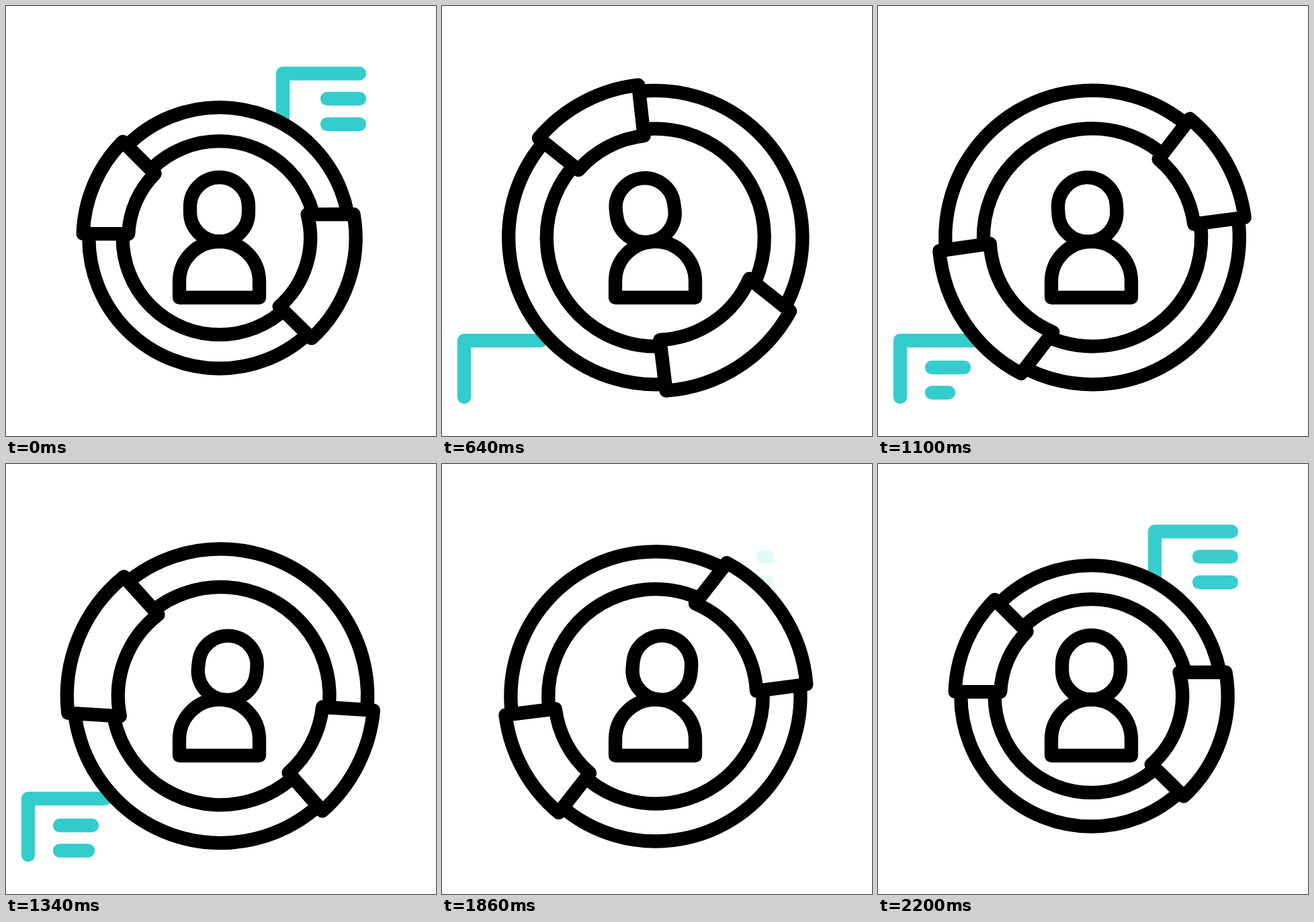
An HTML page with a canvas that plays this animation: 640x640 px, repeating every 2.4 s.

```html
<!DOCTYPE html>
<html lang="en">
<head>
<meta charset="utf-8">
<title>Support ring</title>
<style>
html, body { margin: 0; width: 100%; height: 100%; overflow: hidden; background: #fff; }
canvas { display: block; width: 640px; height: 640px; }
</style>
</head>
<body>
<canvas id="stage" width="640" height="640"></canvas>
<script>
const ctx = document.getElementById('stage').getContext('2d');
const LOOP = 2400, STEP = 20, START = 200, SPAN = 2000;
const TEAL = '#33cccc', RAD = Math.PI / 180;

const clamp = v => Math.min(1, Math.max(0, v));
const smooth = v => v * v * (3 - 2 * v);
const ease = (u, from, to) => smooth(clamp((u - from) / (to - from)));
const mix = (a, b, k) => a + (b - a) * k;

// cubic-bezier(1/3, 0, 5/6, 1), solved by bisection
function spin(u) {
  let lo = 0, hi = 1;
  for (let i = 0; i < 30; i++) {
    const s = (lo + hi) / 2, r = 1 - s;
    if (r * r * s + 2.5 * r * s * s + s * s * s < u) lo = s; else hi = s;
  }
  return smooth(lo);
}

// Strokes the part of a polyline between fractions a and b
function trim(points, a, b) {
  if (b - a < 0.002) return;
  const lens = points.slice(1).map((p, i) => Math.hypot(p[0] - points[i][0], p[1] - points[i][1]));
  const total = lens.reduce((x, y) => x + y);
  let pos = 0, open = false;
  ctx.beginPath();
  lens.forEach((len, i) => {
    const k0 = clamp((a * total - pos) / len), k1 = clamp((b * total - pos) / len);
    const [p, q] = [points[i], points[i + 1]];
    if (k1 > k0) {
      if (!open) ctx.moveTo(mix(p[0], q[0], k0), mix(p[1], q[1], k0));
      ctx.lineTo(mix(p[0], q[0], k1), mix(p[1], q[1], k1));
      open = true;
    }
    pos += len;
  });
  ctx.stroke();
}

const topLines = [
  [[412, 170], [412, 100.5], [526, 100.5]],
  [[478, 138], [526, 138]],
  [[478, 176], [526, 176]]
];
const lowLines = [
  { path: [[147, 498], [33, 498], [33, 582]], from: 0.1, to: 0.22 },
  { path: [[80, 538], [128, 538]], from: 0.22, to: 0.36 },
  { path: [[80, 575.5], [122, 575.5]], from: 0.36, to: 0.52 }
];

function drawLabels(u) {
  ctx.strokeStyle = TEAL;
  if (u < 0.5) {
    const out = ease(u, 0, 0.1);
    ctx.globalAlpha = 1 - out;
    topLines.forEach(p => trim(p, out, 1));
  } else {
    const grow = ease(u, 0.78, 1);
    ctx.globalAlpha = 0.97 * grow;
    topLines.forEach(p => trim(p, 0, grow));
  }
  const out = ease(u, 0.7, 0.8);
  ctx.globalAlpha = 1 - out;
  lowLines.forEach(l => trim(l.path, out, ease(u, l.from, l.to)));
  ctx.globalAlpha = 1;
}

function circle(r) {
  ctx.beginPath();
  ctx.arc(0, 0, r, 0, 2 * Math.PI);
  ctx.fill();
  ctx.stroke();
}

// Outer edge spans o0..o1 degrees, inner edge i0..i1
function segment(k, o0, o1, i0, i1) {
  ctx.beginPath();
  ctx.arc(0, 0, 203 * k, o0 * RAD, o1 * RAD);
  ctx.arc(0, 0, 135.5 * k, i1 * RAD, i0 * RAD, true);
  ctx.closePath();
  ctx.fill();
  ctx.stroke();
}

function drawRing(u) {
  const k = 1 + 0.126 * (ease(u, 0, 0.23) - ease(u, 0.78, 1));
  ctx.save();
  ctx.translate(318.5, 345.2);
  ctx.rotate(spin(u) * 2 * Math.PI);
  ctx.translate(-0.9, 0);
  circle(194.3 * k);
  circle(144 * k);
  segment(k, 181.75, 224.9, 182.6, 224.9);
  segment(k, -10, 47.4, -15, 48.9);
  ctx.restore();
}

function drawPerson(u) {
  const tilt = -10 * ease(u, 0, 0.31) + 20.2 * ease(u, 0.31, 0.667) - 10.2 * ease(u, 0.667, 1);
  ctx.save();
  ctx.translate(317.5, 410);
  ctx.beginPath();
  ctx.arc(0, 0, 59.5, Math.PI, 0);
  ctx.lineTo(59.5, 24);
  ctx.lineTo(-59.5, 24);
  ctx.closePath();
  ctx.stroke();
  ctx.rotate(tilt * RAD);
  ctx.beginPath();
  ctx.arc(0, -111.5, 43.5, Math.PI, 0);
  ctx.arc(0, -103, 43.5, 0, Math.PI);
  ctx.closePath();
  ctx.stroke();
  ctx.restore();
}

function draw(now) {
  const t = Math.floor((now % LOOP) / STEP + 1e-6) * STEP;
  const u = clamp((t - START) / SPAN);
  ctx.fillStyle = '#fff';
  ctx.fillRect(0, 0, 640, 640);
  ctx.lineWidth = 20.3;
  ctx.lineCap = ctx.lineJoin = 'round';
  drawLabels(u);
  ctx.strokeStyle = '#000';
  drawRing(u);
  drawPerson(u);
}

let begin = null;
function tick(now) {
  if (begin === null) begin = now;
  draw(Math.max(0, now - begin));
  requestAnimationFrame(tick);
}
draw(0);
requestAnimationFrame(tick);
</script>
</body>
</html>
```
